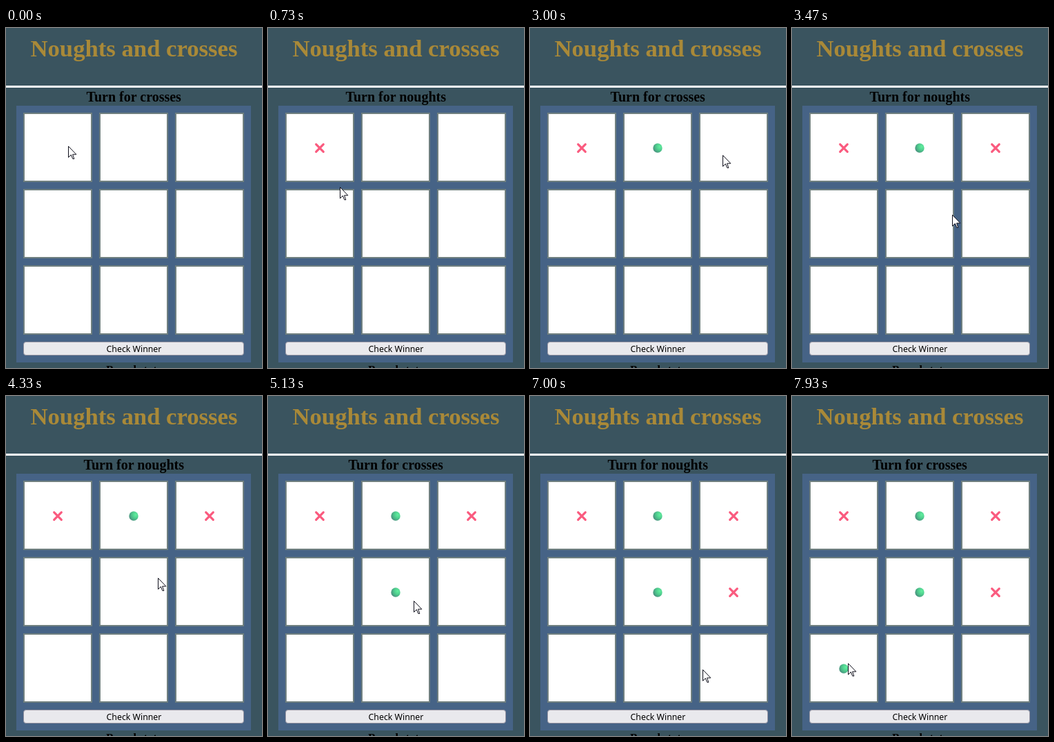
These frames come from a looping animation (371x490 px, 8000 ms). An HTML page:

```html
<!DOCTYPE html>
<html lang="en">
<head>
<meta charset="utf-8">
<title>Noughts and crosses</title>
<style>
  html, body { margin: 0; width: 100%; height: 100%; overflow: hidden; background: #3a545f; }
  svg { display: block; }
  text { text-anchor: middle; }
  .serif { font-family: "Liberation Serif", serif; font-weight: bold; }
  .button { font: 12.3px "Noto Sans", sans-serif; }
</style>
</head>
<body>
<svg width="371" height="490" viewBox="0 0 371 490">
  <defs>
    <radialGradient id="green" cx=".72" cy=".36" r=".75">
      <stop offset="0" stop-color="#62ee9f"/>
      <stop offset=".45" stop-color="#50d08f"/>
      <stop offset="1" stop-color="#47917d"/>
    </radialGradient>
    <path id="cross" d="M-5.3-5.3L5.3 5.3M5.3-5.3L-5.3 5.3" stroke="#fa5a7e" stroke-width="3.2" stroke-linecap="round"/>
    <circle id="nought" r="6.7" fill="url(#green)"/>
  </defs>
  <text class="serif" x="185.5" y="41" font-size="34.7" fill="#a98938">Noughts and crosses</text>
  <rect y="83" width="371" height="3" fill="#fff"/>
  <text class="serif" id="status" x="185.2" y="106" font-size="20"></text>
  <rect x="15" y="112" width="340" height="370" fill="#466386"/>
  <g id="cells" fill="#fff" stroke="#708080" stroke-width="2"></g>
  <rect x="25.5" y="452.5" width="319" height="19" rx="3.5" fill="#e9e9ed" stroke="#8f8f9d"/>
  <text class="button" x="185.5" y="467">Check Winner</text>
  <text class="serif" x="185.5" y="498" font-size="16.5">Board state</text>
  <g id="marks"></g>
  <path id="cursor" d="M.5.5V16.5L4.3 12.8L6.8 18.6H8.8L6.6 12.2H11.8Z" fill="#fff" stroke="#10101c"/>
</svg>
<script>
const STEPS_PER_SECOND = 15, LOOP_STEPS = 120;
const CELL = 110, CENTER_X = 75, CENTER_Y = 173;
const byId = id => document.getElementById(id);

// The game is a chain of glides, rests and clicks, with durations in steps.
const legs = [], clicks = [];
let clock = 0, hand = { x: 90, y: 170 };

function glide(x, y, steps) {
  const to = { x, y };
  legs.push({ start: clock, steps, from: hand, to });
  hand = to;
  clock += steps;
}
const rest = steps => glide(hand.x, hand.y, steps);
const snap = (value, center) => center + Math.round((value - center) / CELL) * CELL;
const click = () => clicks.push({ step: clock, x: snap(hand.x, CENTER_X), y: snap(hand.y, CENTER_Y) });

rest(1);
click();
glide(104, 229, 7);
rest(3);
glide(170, 174, 11);
rest(2);
click();
glide(188, 269, 6);
rest(7);
glide(279, 183, 8);
rest(2);
click();
glide(238, 283, 3);
glide(228, 261, 3);
rest(8);
glide(207, 264, 9);
rest(1);
click();
glide(214, 314, 9);
rest(1);
glide(292, 289, 7);
rest(1);
click();
glide(286, 394, 8);
rest(5);
glide(186, 394, 7);
rest(3);
glide(66, 383, 3);
rest(2);
glide(81, 385, 1);
rest(1);
click();
rest(1);

for (let i = 0; i < 9; i++) {
  const x = CENTER_X - 49 + i % 3 * CELL, y = CENTER_Y - 50 + Math.floor(i / 3) * CELL;
  byId('cells').innerHTML += `<rect x="${x}" y="${y}" width="98" height="98"/>`;
}
byId('marks').innerHTML = clicks.map(({ x, y }, i) =>
  `<use href="#${i % 2 ? 'nought' : 'cross'}" x="${x}" y="${y}"/>`).join('');
const marks = [...byId('marks').children];

function cursorAt(step) {
  const { start, steps, from, to } = legs.findLast(leg => leg.start <= step);
  const eased = ((step - start) / steps) ** 1.2;
  const mix = axis => Math.round(from[axis] + (to[axis] - from[axis]) * eased);
  return [mix('x'), mix('y')];
}

function draw(ms) {
  // Steps fall on times rounded to 10 ms, hence the small lead.
  const step = Math.floor((ms + 5) / 1000 * STEPS_PER_SECOND) % LOOP_STEPS;
  const played = clicks.filter(c => c.step <= step).length;
  marks.forEach((mark, i) => mark.setAttribute('visibility', i < played ? 'visible' : 'hidden'));
  byId('status').textContent = `Turn for ${played % 2 ? 'noughts' : 'crosses'}`;
  byId('cursor').setAttribute('transform', `translate(${cursorAt(step)})`);
}

const begin = performance.now();
function tick() {
  draw(performance.now() - begin);
  requestAnimationFrame(tick);
}
tick();
</script>
</body>
</html>
```
